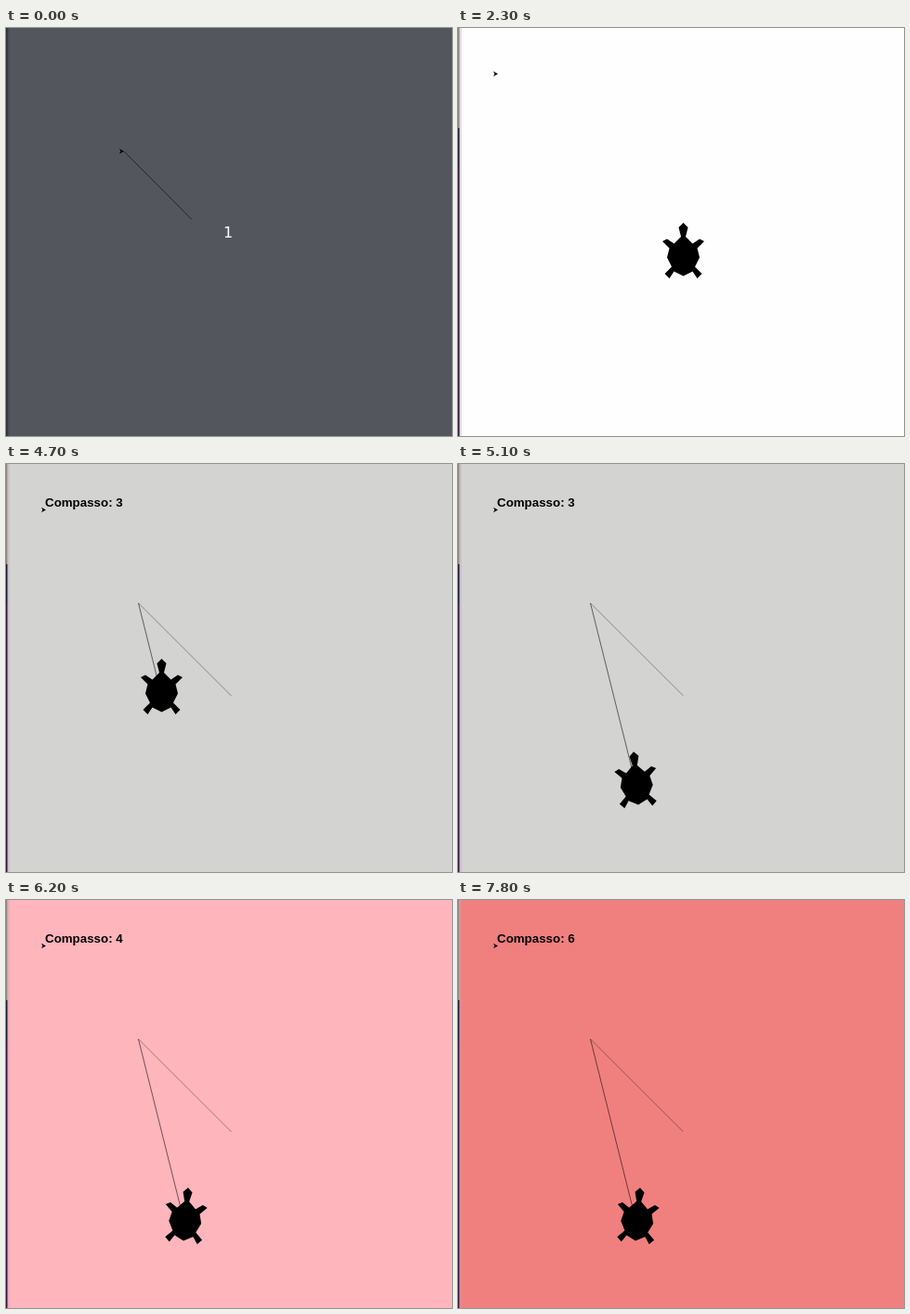
Recreate the animation shown at these times as an HTML page with a canvas. Size 480 by 440 pixels, loop 8000 ms.

```html
<!DOCTYPE html>
<html lang="pt">
<head>
<meta charset="utf-8">
<style>
html, body { margin: 0; width: 100%; height: 100%; overflow: hidden; }
canvas { display: block; }
</style>
</head>
<body>
<canvas id="stage" width="480" height="440"></canvas>
<script>
const ctx = document.getElementById('stage').getContext('2d');
const LOOP = 8000, STEP = 100;
const WHITE = '#fefefe', DIM = '#53565c', INK = '#000';

// The number is wiped at each bar start and rewritten one step later.
const BARS = [
  { at: 1200, count: 0, bg: WHITE },
  { at: 2300, count: 1, bg: WHITE },
  { at: 3300, count: 2, bg: WHITE },
  { at: 4400, count: 3, bg: '#d3d3d1' },
  { at: 5400, count: 4, bg: '#feb5bc' },
  { at: 6500, count: 5, bg: '#feffdd' },
  { at: 7500, count: 6, bg: '#f0807e' }
];
const SWINGS = [5000, 5200, 5500, 5700, 6000, 6200, 6600, 6800, 7100, 7300, 7600, 7800];
const TILT = 5 * Math.PI / 180;

const HOME = [242.5, 250], CORNER = [142.5, 150], REST = [192.5, 350];
const ARROW_HOME = [43, 49.5];

// Right half of the turtle, head up; the left half mirrors it.
const HALF = [[0, 16], [2, 14], [1, 10], [4, 7], [7, 9], [9, 8], [6, 5], [7, 1],
  [5, -3], [8, -6], [6, -8], [4, -5], [0, -7]];
const TURTLE = HALF.concat(HALF.slice(1, -1).reverse().map(([x, y]) => [-x, y]))
  .map(([x, y]) => [x * 2.5, -y * 2.5]);
const ARROW = [[0, 0], [-5, -2.7], [-3.6, 0], [-5, 2.7]];

const ramp = (t, from, to) => Math.min(1, Math.max(0, (t - from) / (to - from)));
const mix = (a, b, k) => [a[0] + (b[0] - a[0]) * k, a[1] + (b[1] - a[1]) * k];

function rect(color, x, y, w, h) {
  ctx.fillStyle = color;
  ctx.fillRect(x, y, w, h);
}

function shape(points, [x, y], angle = 0) {
  ctx.save();
  ctx.translate(x, y);
  ctx.rotate(angle);
  ctx.beginPath();
  points.forEach(p => ctx.lineTo(p[0], p[1]));
  ctx.closePath();
  ctx.fillStyle = INK;
  ctx.fill();
  ctx.restore();
}

function line(a, b, alpha) {
  ctx.beginPath();
  ctx.moveTo(a[0], a[1]);
  ctx.lineTo(b[0], b[1]);
  ctx.lineWidth = 0.8;
  ctx.strokeStyle = `rgba(0,0,0,${alpha})`;
  ctx.stroke();
}

function label(text, font, color, x, y) {
  ctx.font = font;
  ctx.fillStyle = color;
  ctx.fillText(text, x, y);
}

function edge(dim) {
  if (dim) {
    rect('#35373c', 0, 0, 2, 440);
    rect('#494c52', 2, 0, 2, 440);
    return;
  }
  rect('#8f8880', 0, 0, 1, 108);
  rect('#1c1c30', 0, 108, 1, 44);
  rect('#38183c', 0, 152, 1, 288);
  rect('#b5aaa8', 1, 0, 1, 108);
  rect('#75697a', 1, 108, 1, 332);
  rect('rgba(190,160,185,.35)', 2, 0, 2, 440);
}

function drawIntro(t) {
  const dim = t < 100;
  const tip = mix([127, 133], ARROW_HOME, ramp(t, 0, 300));
  rect(dim ? DIM : WHITE, 0, 0, 480, 440);
  edge(dim);
  line(dim ? [200, 206.5] : HOME, tip, dim ? 0.7 : 0.5);
  shape(ARROW, tip);
  if (dim) label('1', '16px "DejaVu Sans", sans-serif', '#fff', 234, 226);
}

function drawBars(t) {
  let bg = WHITE, count = 0;
  for (const bar of BARS) {
    if (t < bar.at) break;
    if (t < bar.at + STEP) { count = null; break; }
    ({ bg, count } = bar);
  }
  rect(bg, 0, 0, 480, 440);
  edge(false);

  const first = mix(HOME, CORNER, ramp(t, 2300, 2700));
  const second = mix(CORNER, REST, ramp(t, 4400, 5000));
  const pos = t > 4400 ? second : first;
  if (t > 2300) line(HOME, first, 0.45);
  if (t > 4400) line(CORNER, second, 0.7);

  const swings = SWINGS.filter(at => at <= t).length;
  const angle = swings ? (swings % 2 ? -TILT : TILT) : 0;
  shape(TURTLE, pos, angle);
  shape(ARROW, ARROW_HOME);
  if (count !== null) {
    label('Compasso: ' + count, 'bold 13.33px "Liberation Sans", Arial, sans-serif', INK, 42, 46);
  }
}

function frame(now) {
  const t = Math.floor((now % LOOP) / STEP) * STEP;
  if (t < 400) drawIntro(t);
  else drawBars(t);
  requestAnimationFrame(frame);
}

const start = performance.now();
const tick = () => {
  const t = Math.floor(((performance.now() - start) % LOOP) / STEP) * STEP;
  if (t < 400) drawIntro(t);
  else drawBars(t);
  requestAnimationFrame(tick);
};
tick();
</script>
</body>
</html>
```
